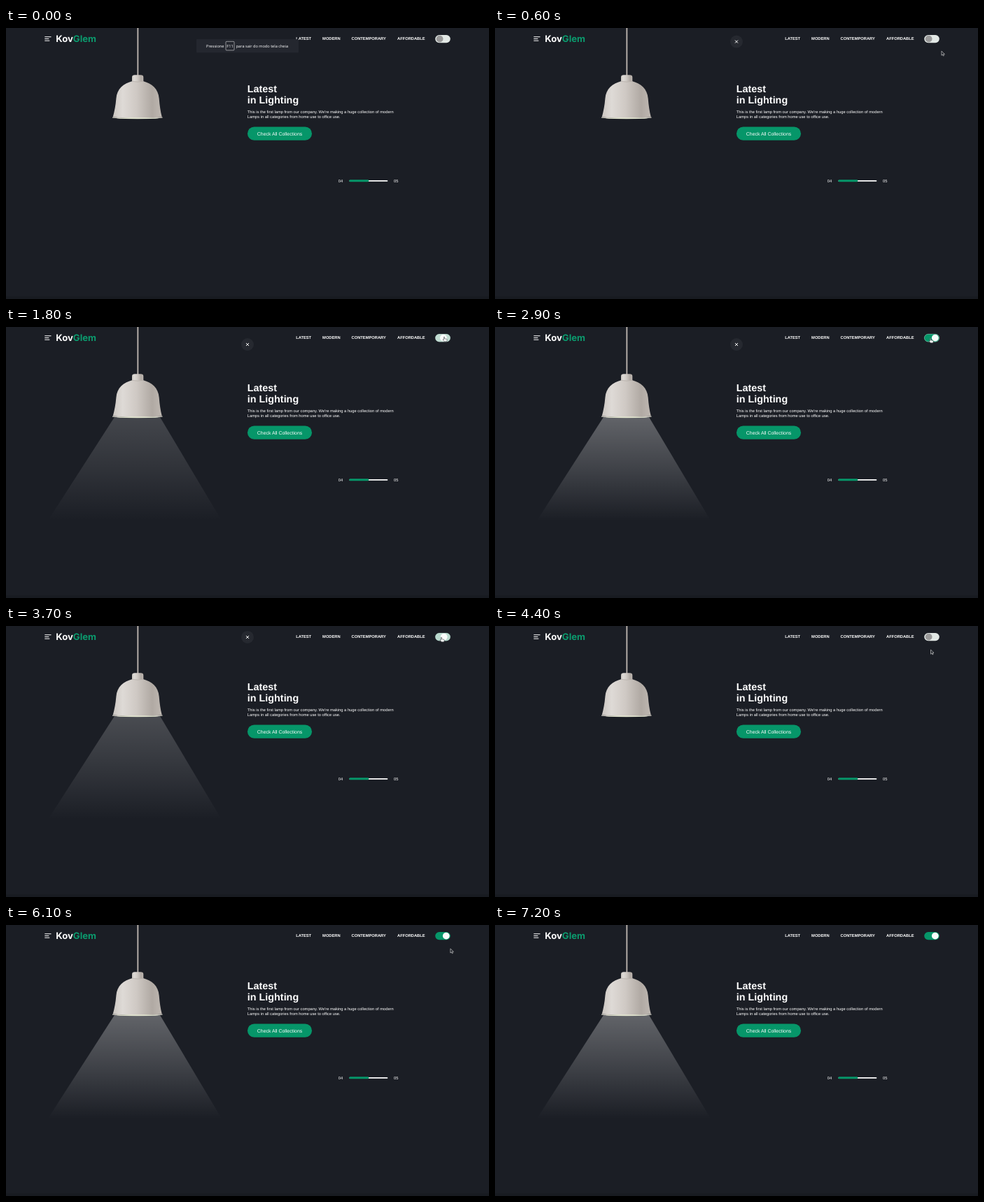
These frames come from a looping animation (690 by 388 pixels, 7300 ms). An HTML page:

```html
<!DOCTYPE html>
<html lang="en">
<head>
<meta charset="utf-8">
<title>Lamp landing page</title>
<style>
  html, body { margin: 0; width: 100%; height: 100%; overflow: hidden; background: #1b1e25; }
  svg { display: block; width: 690px; height: 388px; }
  text { font-family: "Liberation Sans", Arial, sans-serif; font-size: 5.75px; fill: #fff; text-rendering: geometricPrecision; white-space: pre; }
  .logo { font: 700 13.1px Inter, sans-serif; }
  .nav { font-weight: 700; }
  .title { font-size: 14.375px; font-weight: 700; }
  .cta { font-size: 6.9px; text-anchor: middle; }
  .hint text { font-family: "Open Sans", "Noto Sans", sans-serif; font-size: 5.62px; }
</style>
</head>
<body>
<svg viewBox="0 0 690 388" width="690" height="388">
  <defs>
    <linearGradient id="beam" x1="0" y1="129" x2="0" y2="277" gradientUnits="userSpaceOnUse">
      <stop offset="0" stop-color="#fff" stop-opacity=".31"/>
      <stop offset=".5" stop-color="#fff" stop-opacity=".16"/>
      <stop offset="1" stop-color="#fff" stop-opacity="0"/>
    </linearGradient>
    <linearGradient id="shade">
      <stop offset="0" stop-color="#cbc6c1"/>
      <stop offset=".2" stop-color="#dedad6"/>
      <stop offset=".48" stop-color="#cfc9c4"/>
      <stop offset=".8" stop-color="#b0a9a3"/>
      <stop offset="1" stop-color="#bfb8b2"/>
    </linearGradient>
  </defs>

  <rect width="690" height="388" fill="#1b1e25"/>
  <rect y="384" width="690" height="4" fill="#181b21"/>

  <path id="cone" d="M155 129H220L308 277H60Z" fill="url(#beam)"/>

  <g id="lamp">
    <rect x="187.4" width="1.9" height="68" fill="#b9b2ac"/>
    <path d="M180 78V70.5Q180 67.2 184 67.2H192.3Q196.3 67.2 196.3 70.5V78Z" fill="url(#shade)"/>
    <path d="M180 76.3C168 79.5 158.4 87 157.4 101C156.6 111 155 119 152.7 127.5Q188 131 222.8 127.5C220.6 119 219.5 111 218.7 101C217.6 87 208.3 79.5 196.3 76.3Z" fill="url(#shade)"/>
    <path d="M180 76.3Q188 78 196.3 76.3" fill="none" stroke="#a8a09a" stroke-width=".5"/>
    <path d="M152 127.4Q188 130 223.5 127.4V128.7Q188 132 152 128.7Z" fill="#c6c3ba"/>
    <ellipse cx="188" cy="129.3" rx="30" ry=".8" fill="#e6ead2"/>
  </g>

  <g fill="#fff">
    <rect x="55.3" y="12.2" width="9.2" height="1"/>
    <rect x="55.3" y="15" width="6" height="1"/>
    <rect x="55.3" y="17.7" width="7" height="1"/>
  </g>
  <text class="logo" x="71.3" y="20">Kov<tspan fill="#0b9b6e">Glem</tspan></text>

  <g class="nav">
    <text x="414.2" y="17.4">LATEST</text>
    <text x="452.1" y="17.4">MODERN</text>
    <text x="493.5" y="17.4">CONTEMPORARY</text>
    <text x="559" y="17.4">AFFORDABLE</text>
  </g>

  <text class="title" x="344.8" y="92">Latest</text>
  <text class="title" x="344.8" y="108.3">in Lighting</text>
  <text x="344.8" y="122.2">This is the first lamp from our company. We're making a huge collection of modern</text>
  <text x="344.8" y="128.8">Lamps in all categories from home use to office use.</text>

  <rect x="345" y="141.5" width="92" height="19.3" rx="9.65" fill="#069669"/>
  <text class="cta" x="391" y="153.6">Check All Collections</text>

  <text x="474.8" y="220.8">04</text>
  <rect x="490.5" y="217.9" width="54.8" height="1.9" rx=".9" fill="#fff"/>
  <rect x="490.5" y="217.3" width="27.6" height="3" rx="1" fill="#069669"/>
  <text x="554" y="220.8">05</text>

  <rect id="pill" x="613.2" y="10" width="21.6" height="11.2" rx="5.6"/>
  <rect id="ring" x="613.4" y="10.2" width="21.2" height="10.8" rx="5.4" fill="none" stroke="#c9eee0" stroke-width=".7"/>
  <circle id="knob" cy="15.6" r="4.9"/>

  <g id="hint" class="hint">
    <rect x="272" y="16" width="146" height="19.2" rx="1" fill="#24272f"/>
    <text x="286" y="27.8">Pressione</text>
    <rect x="314" y="19.3" width="12" height="12.6" rx="1" fill="none" stroke="#fff" stroke-width=".5"/>
    <text x="320" y="27.8" text-anchor="middle">F11</text>
    <text x="328.7" y="27.8">para sair do modo tela cheia</text>
  </g>

  <g id="close">
    <circle r="9" fill="#262930"/>
    <path d="M-2-2L2 2M2-2L-2 2" stroke="#fff" stroke-width="1"/>
  </g>

  <g id="cursor" stroke-linejoin="round">
    <path id="arrow" d="M0 0V6.2L1.5 4.8L2.5 7L3.5 6.5L2.6 4.4H4.5Z" fill="#1b1e25" stroke="#e0e0e0" stroke-width=".6"/>
    <path id="hand" d="M-.6 .4Q0-.6 .6 .4V2.8L3.6 3.4Q4.3 3.6 4.2 4.4L3.6 6.8H.2L-2 4.2Q-1.8 3.3-.6 4.2Z" fill="#fff" stroke="#3a3d42" stroke-width=".6"/>
  </g>
</svg>

<script>
const LOOP = 7300, STEP = 100;
const el = id => document.getElementById(id);
const smooth = p => p * p * (3 - 2 * p);
const ramp = (t, from, span) => Math.min(1, Math.max(0, (t - from) / span));
const ease = (t, from, span) => smooth(ramp(t, from, span));
const mix = (a, b, k) => `rgb(${a.map((v, i) => Math.round(v + (b[i] - v) * k))})`;
const set = (id, attrs) => {
  for (const key in attrs) el(id).setAttribute(key, attrs[key]);
};

// Mouse glides, each starting where the last one ended.
const glides = [
  { from: 100, span: 700, x: 626, y: 14 },
  { from: 2300, span: 200, x: 622, y: 16 },
  { from: 4200, span: 200, x: 622.5, y: 34 },
  { from: 4500, span: 500, x: 628, y: 16 },
  { from: 6000, span: 400, x: 672, y: 130 }
];

function mouse(t) {
  let x = 686, y = 110;
  for (const g of glides) {
    const k = ease(t, g.from, g.span);
    x += (g.x - x) * k;
    y += (g.y - y) * k;
  }
  return { x, y };
}

function draw(t) {
  const first = ramp(t, 1480, 600) - ramp(t, 3400, 700);
  const power = first + ramp(t, 5200, 150);
  const light = smooth(smooth(power));

  set("cone", { opacity: light });
  set("pill", { fill: mix([226, 232, 229], [6, 150, 105], power ** 3) });
  set("ring", { opacity: first * .6 });
  set("knob", {
    cx: 619.6 + 9.2 * light,
    fill: mix([153, 153, 153], [250, 252, 251], Math.min(1, light * 2))
  });

  set("hint", { transform: `translate(0 ${-36 * ease(t, 0, 400)})` });
  const drop = ease(t, 300, 400) - ease(t, 3500, 600);
  set("close", { transform: `translate(345 ${35 * drop - 10})` });

  const { x, y } = mouse(t);
  const over = x > 613 && x < 635 && y > 10 && y < 21;
  const shown = t >= 100 && t < 6400;
  set("cursor", { transform: `translate(${x} ${y})`, visibility: shown ? "visible" : "hidden" });
  set("arrow", { opacity: over ? 0 : 1 });
  set("hand", { opacity: over ? 1 : 0 });
}

const start = performance.now();
function tick() {
  const t = (performance.now() - start) % LOOP;
  draw(Math.floor(t / STEP) * STEP);
  requestAnimationFrame(tick);
}
draw(0);
tick();
</script>
</body>
</html>
```
